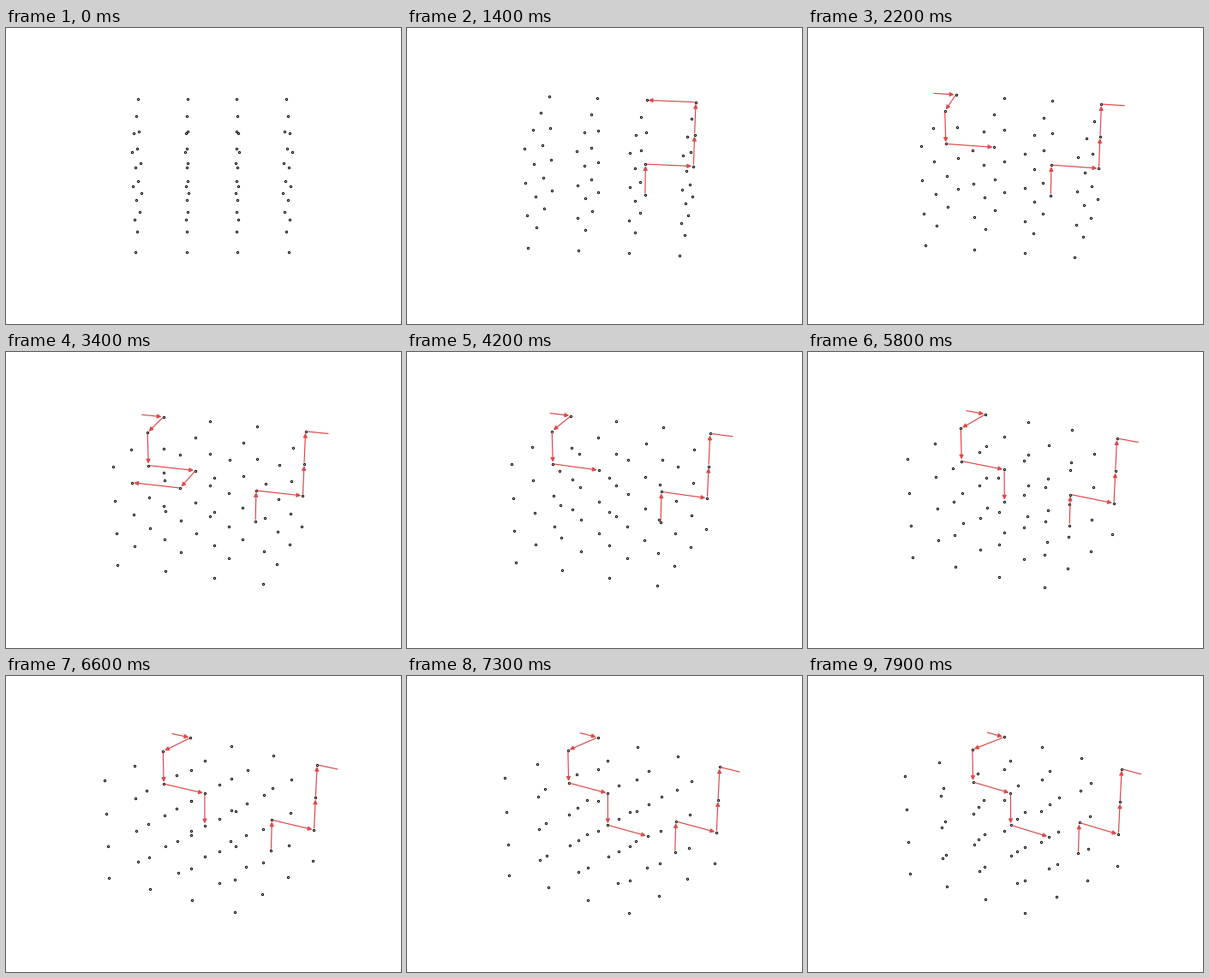
A matplotlib script that plays this animation: 461 by 346 pixels, repeating every 8000 ms.

```python
import itertools

import numpy as np
import matplotlib.pyplot as plt
from matplotlib.animation import FuncAnimation
from matplotlib.patches import FancyArrowPatch

W, H, DPI = 461, 346, 72
FRAMES, INTERVAL = 80, 100
N = 4                          # sites per lattice edge
TURN = np.radians(-0.5)        # rotation per frame
ELEV = np.radians(30)
DIST = 10                      # camera distance
CENTER = np.array([240.4, 175.2])
SCALE = np.array([1930.4, 1438.5])
RED = "#dd4a4a"

START = (2, 3, 0)
# (frame, steps kept, move added)
GROWTH = [
    (2, 0, "+z"), (5, 1, "+x"), (8, 2, "+z"), (11, 3, "+z"), (13, 4, "-x"),
    (16, 4, "+x"), (18, 5, "-y"), (20, 6, "-z"), (22, 7, "+x"),
    (25, 8, "-y"), (30, 9, "-x"), (38, 9, None), (42, 8, None),
    (58, 8, "-z"), (72, 9, "+x"),
]


def project(sites, frame):
    """Perspective view of lattice sites, in pixels."""
    x, y, z = ((np.asarray(sites, float) - (N - 1) / 2) / 3.3).T
    c, s = np.cos(TURN * frame), np.sin(TURN * frame)
    x, y = x * c - y * s, x * s + y * c
    up = z * np.cos(ELEV) + y * np.sin(ELEV)
    depth = DIST + y * np.cos(ELEV) - z * np.sin(ELEV)
    return CENTER + SCALE * np.column_stack([x, up]) / depth[:, None]


def moves_at(frame):
    moves = []
    for when, keep, move in GROWTH:
        if when <= frame:
            moves = moves[:keep] + ([move] if move else [])
    return moves


def segments(moves):
    """Yield (tail, tip, style); steps across the boundary are split in two."""
    site = np.array(START)
    for sign, axis in moves:
        step = np.zeros(3, int)
        step["xyz".index(axis)] = 1 if sign == "+" else -1
        tip = site + step
        wrapped = tip % N
        if (tip == wrapped).all():
            yield site, tip, "-|>"
        else:
            yield site, site + step / 2, "-"
            yield wrapped - step / 2, wrapped, "-|>"
        site = wrapped


fig = plt.figure(figsize=(W / DPI, H / DPI), dpi=DPI, facecolor="white")
ax = fig.add_axes([0, 0, 1, 1])
ax.set_xlim(0, W)
ax.set_ylim(0, H)
ax.axis("off")

lattice = list(itertools.product(range(N), repeat=3))
dots = ax.scatter(*project(lattice, 0).T, s=5, facecolor="white",
                  edgecolor="black", linewidth=1, zorder=2)
arrows = []


def draw(frame):
    dots.set_offsets(project(lattice, frame))
    while arrows:
        arrows.pop().remove()
    for tail, tip, style in segments(moves_at(frame)):
        a, b = project([tail, tip], frame)
        arrow = FancyArrowPatch(a, b, arrowstyle=style, mutation_scale=10,
                                shrinkA=2, shrinkB=2, color=RED, lw=1.2,
                                zorder=3)
        arrows.append(ax.add_patch(arrow))
    return [dots, *arrows]


anim = FuncAnimation(fig, draw, frames=FRAMES, interval=INTERVAL,
                     init_func=lambda: draw(0), repeat=True, repeat_delay=0)
plt.show()
```
